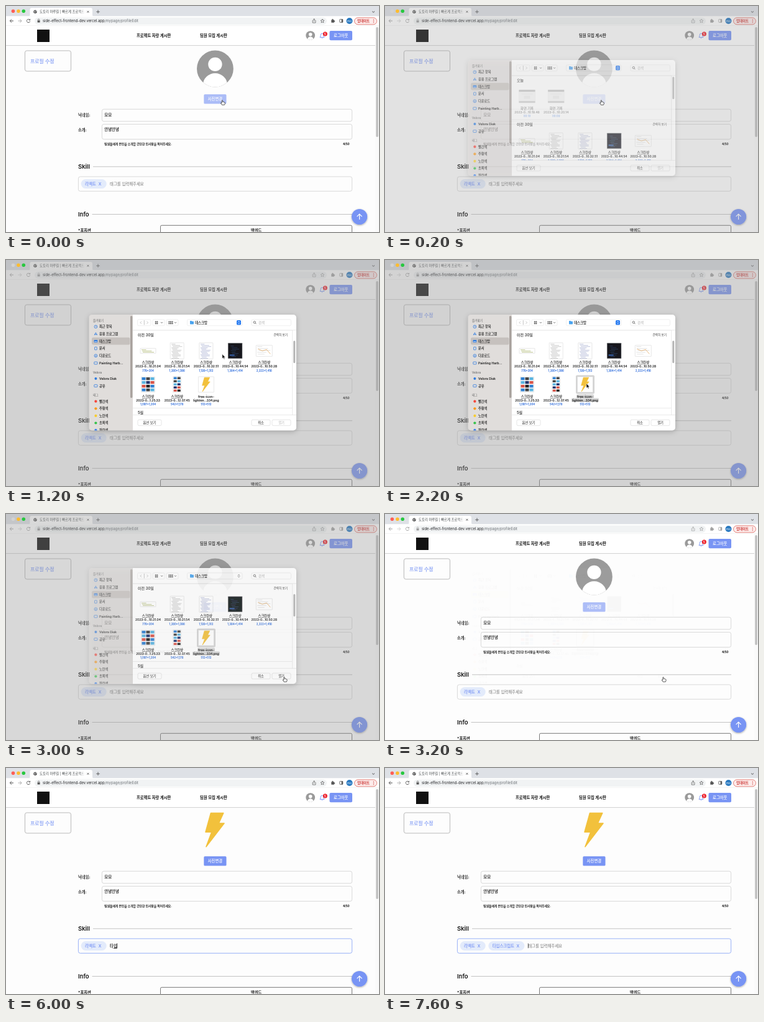
Animation of 600 by 364 pixels, one loop 8 s. Source, as an HTML page:

```html
<!DOCTYPE html>
<html lang="ko">
<head>
<meta charset="utf-8">
<title>Profile edit</title>
<style>
html, body { margin: 0; width: 100%; height: 100%; overflow: hidden; background: #fdfdfd; }
svg { display: block; width: 600px; height: 364px; }
text { font-family: Inter, "Noto Sans CJK KR", "Noto Sans CJK", sans-serif; white-space: pre; }
</style>
</head>
<body>
<svg id="stage" viewBox="0 0 600 364" xmlns="http://www.w3.org/2000/svg"></svg>
<script>
const BLUE = '#7894f4', INK = '#111';

// markup helpers; medium weight gets a hairline stroke, as Hangul may lack that weight
const text = (x, y, size, str, fill = INK, weight = 400, anchor = 'start', extra = '') =>
  `<text x="${x}" y="${y}" font-size="${size}" fill="${fill}" font-weight="${weight}" text-anchor="${anchor}"` +
  `${weight === 500 ? ` stroke="${fill}" stroke-width=".14"` : ''} ${extra}>${str}</text>`;
const rect = (x, y, w, h, fill, r = 0, extra = '') =>
  `<rect x="${x}" y="${y}" width="${w}" height="${h}" rx="${r}" fill="${fill}" ${extra}/>`;
const box = (x, y, w, h, stroke = '#d0d0d0', r = 3, extra = '') =>
  rect(x, y, w, h, '#fdfdfd', r, `stroke="${stroke}" stroke-width=".8" ${extra}`);
const dot = (x, y, r, fill, extra = '') => `<circle cx="${x}" cy="${y}" r="${r}" fill="${fill}" ${extra}/>`;
const line = (d, stroke, w = .8, extra = '') =>
  `<path d="${d}" fill="none" stroke="${stroke}" stroke-width="${w}" ${extra}/>`;
const group = (id, body, extra = '') => `<g id="${id}" ${extra}>${body}</g>`;

const bolt = '<path d="M329.5 72.5H349.8L342.3 89H351L322 126.8L330.8 103.3H321Z" fill="#f2c13c" stroke="#f2c13c" stroke-width="1.6" stroke-linejoin="round"/>';

function person(x, y, r, id) {
  return `<clipPath id="${id}"><circle cx="${x}" cy="${y}" r="${r}"/></clipPath>` +
    dot(x, y, r, '#9a9a9a') + dot(x, y - r * .24, r * .38, '#fff') +
    `<ellipse cx="${x}" cy="${y + r * .87}" rx="${r * .66}" ry="${r * .62}" fill="#fff" clip-path="url(#${id})"/>`;
}

function browser() {
  const icons =
    line('M12 24H6.5M9 21.3L6.3 24L9 26.7', '#555', 1) +
    line('M19.5 24H25M22.5 21.3L25.2 24L22.5 26.7', '#aaa', 1) +
    line('M38.3 22.4A2.7 2.7 0 1 0 38.7 24.6M38.7 20.8V22.8H36.5', '#555', .9) +
    rect(50.6, 23.3, 4, 3.2, '#555', .5) + line('M51.4 23.4V22.2A1.2 1.2 0 0 1 53.8 22.2V23.4', '#555', .7) +
    line('M494 23H493.2V27H498V23H497.2M495.6 25V20.8M494.2 22L495.6 20.6L497 22', '#555', .7) +
    line('M509 21L509.9 23L512 23.2L510.4 24.6L510.9 26.8L509 25.6L507.1 26.8L507.6 24.6L506 23.2L508.1 23Z', '#555', .7) +
    rect(523.3, 22.2, 4.6, 4.6, '#555', .6) + dot(525.4, 21.8, 1, '#555') + dot(528.2, 24.5, 1, '#555') +
    rect(536.8, 21.4, 5, 5, 'none', .6, 'stroke="#555" stroke-width=".8"') + rect(539.6, 21.4, 2.2, 5, '#555');
  return rect(0, 0, 600, 16.5, '#dee1e6') +
    '<path d="M36 16.5Q38.5 16.5 38.5 14V6Q38.5 3 41.5 3H136Q139 3 139 6V14Q139 16.5 141.5 16.5Z" fill="#fff"/>' +
    dot(47, 9.3, 2.7, '#555') + line('M45 8.2L47 9.2L46.3 11M48 7.2L49 9', '#fff', .7) +
    text(54, 11.3, 5.4, '도토리 마루길 | 빠르게 프로젝트를 ㅅ', '#3c4043', 400, 'start', 'clip-path="url(#tabClip)"') +
    rect(116, 4, 12, 11, 'url(#tabFade)') +
    line('M130.4 7.8L133.4 10.8M133.4 7.8L130.4 10.8', '#444', .8) + line('M148 6.5V12M145.2 9.3H150.8', '#444', .8) +
    line('M589 8.5L591 10.4L593 8.5', '#444', .9) +
    rect(0, 16.5, 600, 15.5, '#fff') + rect(46, 18.5, 470, 11.5, '#f1f3f4', 5.7) +
    group('icons', icons) +
    text(59, 26.4, 5.85, 'side-effect-frontend-dev.vercel.app<tspan fill="#6b7075">/mypage/profileEdit</tspan>', '#202124') +
    dot(552.5, 24, 5, '#2979c0') + text(552.5, 25.7, 4.6, 'mo', '#fff', 400, 'middle') +
    rect(560.5, 18.8, 36, 11, '#fdeceb', 5.5, 'stroke="#d95249" stroke-width=".7"') +
    text(565, 26.4, 5.4, '업데이트', '#c5221f', 500) +
    [21.8, 24.2, 26.6].map(y => dot(591.3, y, .6, '#c5221f')).join('') +
    line('M0 32H600', '#dcdcdc', .6);
}

const lights = dot(11.5, 8.3, 2.8, '#fe5f57', 'id="close"') + dot(20, 8.3, 2.8, '#febc2e') + dot(28.3, 8.3, 2.8, '#28c840');

const chip = (x, w, str, xPos) => rect(x, 279, w, 15, '#e3ebfb', 7.5) +
  text(x + 6.3, 288.9, 6.4, str, BLUE, 500) + text(xPos, 288.9, 6.6, 'X', BLUE, 500, 'middle');

function page() {
  return rect(0, 32, 600, 332, '#fdfdfd') + rect(0, 32, 600, 31.5, '#fff') + line('M0 63.6H594', '#c4c4c4', .8) +
    rect(50, 38, 20, 20, '#111') +
    text(210, 50, 6.3, '프로젝트 자랑 게시판', INK, 600) + text(312, 50, 6.3, '팀원 모집 게시판', INK, 600) +
    person(489.7, 47.6, 7.4, 'smallFace') +
    line('M505 50.4H512Q510.8 49.2 510.8 46.8A2.3 2.6 0 0 0 506.2 46.8Q506.2 49.2 505 50.4ZM507.6 51.4A1 1 0 0 0 509.4 51.4', BLUE, .9) +
    dot(513.4, 44.9, 3.5, '#ee1c25') + text(513.4, 46.8, 5, '5', '#fff', 600, 'middle') +
    rect(520.5, 40, 36.5, 15.3, BLUE, 2) + text(538.7, 50, 6.3, '로그아웃', '#fff', 500, 'middle') +
    box(30.5, 72, 74, 33, '#a9a9a9') + text(39, 91.6, 7.9, '프로필 수정', BLUE, 500) +
    group('face', person(336.4, 101, 29.4, 'bigFace')) + group('bolt', bolt) +
    rect(318.3, 142.3, 36.2, 15.2, BLUE, 1.6, 'id="change"') + text(336.4, 152.3, 6.3, '사진변경', '#fff', 500, 'middle') +
    text(116, 178.3, 6.3, '닉네임:', INK, 500) + box(154.4, 166.2, 402.2, 19.6) + text(158.3, 178.3, 6.4, '모모', INK, 500) +
    text(116, 202.3, 6.3, '소개:', INK, 500) + box(154.4, 190.4, 402.2, 24.2) + text(158.3, 200.8, 6.4, '안녕안녕', INK, 500) +
    text(158.3, 224.2, 4.75, '팀원들에게 본인을 소개할 간단한 인사말을 적어주세요.', INK, 500) +
    text(552.6, 224.2, 4.7, '4/50', INK, 500, 'end') +
    text(116, 262.4, 9.6, 'Skill', INK, 500) + line('M140 258.8H557', '#b4b4b4') +
    box(116.4, 274.9, 440.2, 23.4, '#d0d0d0', 3, 'id="field"') + chip(120.7, 41, '리액트', 151) +
    group('newChip', chip(166.4, 58, '타입스크립트', 213.8)) +
    text(167, 288.9, 6.4, '태그를 입력해주세요', '#757575', 400, 'start', 'id="hint"') +
    text(167, 288.9, 6.4, '', INK, 500, 'start', 'id="typed"') +
    rect(0, 290.3, 5.6, .7, INK, 0, 'id="under"') + rect(0, 282.4, .7, 7.8, INK, 0, 'id="caret"') +
    text(116, 339.3, 9.6, 'Info', INK, 500) + line('M138.5 335.5H557', '#b4b4b4') +
    text(116, 363.6, 6.3, '*포지션', INK, 600) + box(248.5, 353.3, 308, 20, '#555', 2) +
    text(402.5, 363.6, 6.3, '백엔드', INK, 500, 'middle') +
    dot(568.6, 339.5, 12.6, BLUE, 'filter="url(#soft)"') + line('M568.6 344V335.4M564.6 339.2L568.6 335.2L572.6 339.2', '#fff', 1.2) +
    rect(594, 32, 6, 332, '#fafafa') + rect(595.2, 34, 3.6, 177, '#c1c1c1', 1.8);
}

// sidebar of the file sheet
function sidebar() {
  const head = (y, s) => text(140, y, 4.6, s, '#858585', 500);
  const item = (y, s, icon) => icon(144.4, y) + text(150, y + 2, 5.2, s, '#2b2b2b', 500);
  const C = '#2f7be0', thin = `stroke="${C}" stroke-width=".8"`;
  const ring = (x, y) => dot(x, y, 2.4, 'none', thin) + line(`M${x} ${y - 1.4}V${y}H${x + 1.2}`, C, .6);
  const app = (x, y) => line(`M${x - 2} ${y + 2}L${x} ${y - 2.3}L${x + 2} ${y + 2}M${x - 2.4} ${y + .8}H${x + 2.4}`, C);
  const desk = (x, y) => rect(x - 2.8, y - 2, 5.6, 4, C, .8) + rect(x - 2, y + .5, 4, .7, '#fff');
  const doc = (x, y) => rect(x - 1.8, y - 2.3, 3.6, 4.6, 'none', .5, thin);
  const down = (x, y) => dot(x, y, 2.4, 'none', thin) + line(`M${x} ${y - 1.3}V${y + 1.2}M${x - 1} ${y + .3}L${x} ${y + 1.3}L${x + 1} ${y + .3}`, C, .6);
  const folder = (x, y) => rect(x - 2.6, y - 1.8, 5.2, 3.8, 'none', .6, thin);
  const plain = (x, y) => dot(x, y, 2, C);
  const tag = c => (x, y) => dot(x, y, 2.1, c);
  const rows = rect(138, 123.4, 61.5, 11.6, '#c6c1be', 2.5) +
    head(98, '즐겨찾기') + item(106, '최근 항목', ring) + item(117.7, '응용 프로그램', app) + item(129.4, '데스크탑', desk) +
    item(141, '문서', doc) + item(152.8, '다운로드', down) + item(164.5, 'Painting Harb...', folder) +
    head(181.5, 'Velora') + item(189.6, 'Velora Disk', plain) + item(201.2, '공유', folder) +
    head(217.7, '태그') +
    [['빨간색', '#f5443b'], ['주황색', '#f79a1d'], ['노란색', '#f7cc2f'], ['초록색', '#35c24c'], ['파란색', '#2f7bf0']]
      .map(([s, c], i) => item(226.3 + 11.6 * i, s, tag(c))).join('');
  return rect(133.5, 87, 70.5, 187, '#e0dddb') + `<g transform="translate(0 .4)">${rows}</g>` +
    rect(200, 89, 3.4, 132, '#a9a29e', 1.6);
}

// thumbnails, drawn around 0,0
const sheetOf = (w, h, fill = '#fff') => rect(-w / 2, -h / 2, w, h, fill, .5, 'stroke="#cfcfcf" stroke-width=".5"');
function lines(w, h, color, step = 1.9) {
  let s = '';
  for (let y = -h / 2 + 2, i = 0; y < h / 2 - 1; y += step, i++)
    s += rect(-w / 2 + 2 + (i % 3), y, (w - 6) * (.4 + .55 * Math.abs(Math.sin(i * 2.3))), .7, color);
  return s;
}
function tiles(cols, rows, w, h) {
  const colors = ['#2d7fd0', '#222', '#d8544a', '#20346e', '#5ab4e0', '#444'];
  let s = '';
  for (let i = 0; i < cols * rows; i++)
    s += rect(-w / 2 + 1 + (i % cols) * (w - 1) / cols, -h / 2 + 1 + Math.floor(i / cols) * (h - 1) / rows,
      (w - 1) / cols - 1, (h - 1) / rows - 1.4, colors[(i * 5 + Math.floor(i / cols)) % 6], .4);
  return s;
}
const thumbs = {
  clip: sheetOf(26, 21, '#ededed') + rect(-13, -10.5, 26, 3.2, '#777') + rect(-9, -4, 18, .8, '#bbb') + rect(-5, -1, 10, 5, '#d2d2d2') + rect(-13, 7.5, 26, 3, '#999'),
  strip: sheetOf(25, 8) + lines(25, 8, '#a9b46a'),
  doc: sheetOf(22, 26) + lines(22, 26, '#b9b9b9'),
  note: sheetOf(22, 26) + lines(22, 26, '#a9b0d2'),
  code: sheetOf(23, 25, '#14161c') + lines(18, 20, '#2f4468', 2.4) + rect(-9, 6, 8, 2, '#3560a8'),
  graph: sheetOf(26, 18) + lines(26, 18, '#d8d8d8', 3) + line('M-10 -3L-3 0L4 -2L10 5', '#e0a050', .7),
  grid: sheetOf(22, 25) + tiles(3, 4, 22, 25),
  tall: sheetOf(13, 26) + tiles(2, 5, 13, 26),
  bolt: sheetOf(25, 25) + `<g transform="scale(.42) translate(-336 -99.5)">${bolt}</g>`
};

function cell(i, y, thumb, a, b, size, extra = '') {
  const x = 228.5 + 46.7 * i;
  return `<g ${extra}><g transform="translate(${x} ${y})">${thumbs[thumb]}</g>` +
    text(x, y + 21, 5.3, a, '#222', 500, 'middle') + text(x, y + 27, 4.9, b, '#222', 500, 'middle') +
    text(x, y + 33.2, 4.3, size, '#3672dd', 500, 'middle') + '</g>';
}
const heading = (id, s, more = '') =>
  group(id, rect(204, 0, 256.5, 14.5, '#fff') + line('M204 0H460.5', '#dedede', .6) + text(212, 9.8, 6, s, '#444', 500) +
    (more && text(453, 9.4, 4.6, more, '#333', 400, 'end')));

function files() {
  const shot = (i, y, thumb, name, size) => cell(i, y, thumb, '스크린샷', '2023-0...' + name, size);
  const body = cell(0, 145.5, 'clip', '화면 기록', '2023-0...10.19.46', '00:10', 'opacity=".45"') +
    cell(1, 145.5, 'clip', '화면 기록', '2023-0...10.20.14', '00:09', 'opacity=".45"') +
    shot(0, 217.3, 'strip', '10.31.04', '778×204') + shot(1, 217.3, 'doc', '10.31.54', '1,280×1,396') +
    shot(2, 217.3, 'note', '10.32.51', '1,126×1,312') + shot(3, 217.3, 'code', '10.44.54', '1,384×1,414') +
    shot(4, 217.3, 'graph', '10.50.28', '2,222×1,416') +
    shot(0, 271.5, 'grid', '1.25.33', '1,097×1,204') + shot(1, 271.5, 'tall', '12.07.45', '542×1,176') +
    group('picked', rect(307, 256.5, 30, 30, '#d4d4d4', 2) + rect(308, 287.6, 28, 6, '#d4d4d4', 1.5) + rect(300, 293.4, 44, 6.4, '#d4d4d4', 1.5)) +
    cell(2, 271.5, 'bolt', 'free-icon-', 'lightnin...334.png', '512×512');
  return '<g clip-path="url(#listClip)">' + group('list', body) + heading('today', '오늘') +
    heading('month', '이전 30일', '간략히 보기') + heading('may', '5월') + '</g>';
}

function panel() {
  const button = (x, w, s, id) => rect(x, 256.3, w, 9.4, '#fff', 2, 'stroke="#d5d5d5" stroke-width=".6"') +
    text(x + w / 2, 263, 5.3, s, '#222', 400, 'middle', `id="${id}"`);
  const frame = (x, w) => rect(x, 94.8, w, 10, '#fff', 2, 'stroke="#e4e4e4" stroke-width=".6"');
  const cells = (x, n) => Array.from({ length: n }, (_, i) =>
    rect(x + (i % (n / 2)) * 2.6, 97.6 + (i >= n / 2 ? 2.7 : 0), 1.9, 1.9, '#555', .3)).join('');
  return rect(204, 87, 263, 187, '#fff') +
    frame(211.5, 21.5) + line('M218 97.8L216 99.8L218 101.8M226.5 97.8L228.5 99.8L226.5 101.8M222.3 96V103.6', '#aaa', .7) +
    frame(236, 19) + cells(239.8, 4) + line('M249 99L250.6 100.6L252.2 99', '#444', .7) +
    frame(258, 19) + cells(261.5, 6) + line('M271 99L272.6 100.6L274.2 99', '#444', .7) +
    frame(291.5, 88.5) + rect(296, 97.7, 6, 4.7, '#4aa3ee', .7) + rect(296, 96.9, 2.8, 2, '#4aa3ee', .5) + text(304, 101.9, 5.4, '데스크탑', '#222', 500) +
    rect(371, 96.1, 7, 7.4, '#2478f0', 1.6, 'id="pop"') + line('M373 99.2L374.5 97.7L376 99.2M373 100.4L374.5 101.9L376 100.4', '#fff', .8, 'id="arrows"') +
    frame(395, 63.5) + dot(399.8, 99.3, 1.7, 'none', 'stroke="#444" stroke-width=".7"') + line('M401 100.6L402.5 102.1', '#444') + text(406, 101.9, 5.4, '검색', '#aaa') +
    files() + line('M204 112H467M204 248.6H467M460.7 112V248.6', '#dcdcdc', .6) +
    rect(462.3, 114, 3, 36, '#b5b5b5', 1.5, 'id="thumb"') +
    button(212, 38, '옵션 보기', 'options') + button(395, 30, '취소', 'cancel') + button(428, 30, '열기', 'open');
}

const cursors =
  group('hand', '<path transform="scale(.85)" d="M-.9 .8Q0 -.6 .9 .8V3.4Q2 2.8 2.6 3.7Q3.7 3.2 4 4.2Q5.2 4 5.2 5.2V6.8L4.3 9H-.6Q-1.7 7.4-2.8 5.6Q-2.6 4.4-.9 5.6Z" fill="#fff" stroke="#111" stroke-width=".8" stroke-linejoin="round"/>') +
  group('arrow', '<path d="M0 0V7.2L1.7 5.7L2.8 8.2L4 7.7L2.9 5.3H5.1Z" fill="#111" stroke="#fff" stroke-width=".5"/>') +
  group('beam', line('M-1.4 -3.8Q0 -3.8 0 -2.8Q0 -3.8 1.4 -3.8M0 -2.8V2.8M-1.4 3.8Q0 3.8 0 2.8Q0 3.8 1.4 3.8', '#111', .7));

const stage = document.getElementById('stage');
stage.innerHTML = `<defs>
  <clipPath id="tabClip"><rect x="54" y="3" width="74" height="13"/></clipPath>
  <clipPath id="listClip"><rect x="204" y="112" width="256.7" height="136.6"/></clipPath>
  <clipPath id="sheetClip"><rect x="133.5" y="87" width="333.5" height="186.5" rx="5"/></clipPath>
  <linearGradient id="tabFade"><stop stop-color="#fff" stop-opacity="0"/><stop offset="1" stop-color="#fff"/></linearGradient>
  <filter id="soft" x="-50%" y="-50%" width="200%" height="200%"><feDropShadow dx="0" dy="1" stdDeviation="1.5" flood-opacity=".35"/></filter>
  <filter id="lift" x="-20%" y="-20%" width="140%" height="150%"><feDropShadow dx="0" dy="2" stdDeviation="4" flood-opacity=".22"/></filter>
</defs>` + browser() + page() + rect(0, 0, 600, 364, '#969696', 0, 'id="dim"') + lights +
  group('sheet', `<g filter="url(#lift)"><g clip-path="url(#sheetClip)">${group('side', sidebar())}${group('main', panel())}</g></g>`) +
  group('cursor', cursors);

const el = {};
stage.querySelectorAll('[id]').forEach(n => el[n.id] = n);
const set = (id, name, v) => el[id].setAttribute(name, v);
const show = (id, on) => set(id, 'visibility', on ? 'inherit' : 'hidden');
const move = (id, x, y) => set(id, 'transform', `translate(${x} ${y})`);

// value between [time, value] points, optionally eased
function track(t, points, ease = u => u) {
  if (t <= points[0][0]) return points[0][1];
  for (let i = 1; i < points.length; i++) {
    const [t0, a] = points[i - 1], [t1, b] = points[i];
    if (t < t1) return a + (b - a) * ease((t - t0) / (t1 - t0));
  }
  return points[points.length - 1][1];
}
const smooth = u => u * u * (3 - 2 * u);

// each syllable as the input method composes it
const typing = [[5400, 'ㅌ'], [5500, '타'], [5600, '탕'], [5800, '타이'], [6000, '타입'], [6300, '타입ㅅ'], [6400, '타입스'],
  [6600, '타입슼'], [6800, '타입스크'], [6900, '타입스클'], [7000, '타입스크리'], [7100, '타입스크립'],
  [7300, '타입스크립ㅌ'], [7400, '타입스크립트'], [7600, '']];

function render(t) {
  const inside = t >= 100 && t < 3400;
  const open = t >= 100 && t < 3260;
  set('icons', 'opacity', inside ? .55 : 1);
  set('close', 'fill', t >= 200 && t < 3150 ? '#d2d2d2' : '#fe5f57');
  set('dim', 'opacity', track(t, [[60, 0], [280, .42], [2900, .42], [3000, .36], [3180, 0]]));
  show('sheet', open);
  move('sheet', 0, track(t, [[400, 0], [600, 1], [2700, 1], [2900, 0]]));
  set('main', 'opacity', track(t, [[60, 0], [290, 1], [2900, 1], [3000, .85], [3200, .02], [3260, 0]]));
  set('side', 'opacity', track(t, [[60, 0], [290, 1], [2900, 1], [3000, .55], [3200, .01], [3260, 0]]));

  const scroll = track(t, [[400, 0], [1100, 72]], smooth);
  const month = Math.max(112, 183 - scroll);
  move('list', 0, -scroll);
  move('month', 0, month);
  move('today', 0, Math.min(112, month - 14.5));
  move('may', 0, 309.5 - scroll);
  move('thumb', 0, scroll * .208);
  show('picked', t >= 2000);
  set('open', 'fill', t >= 2000 ? '#222' : '#b5b5b5');
  set('pop', 'fill', t >= 2900 ? '#fff' : '#2478f0');
  set('arrows', 'stroke', t >= 2900 ? '#444' : '#fff');

  show('face', t < 3400);
  show('bolt', t >= 3400);
  set('change', 'fill', t < 3900 ? '#abbcf7' : BLUE);

  const focus = t >= 4800, done = t >= 7600;
  let typed = '';
  for (const [at, s] of typing) if (t >= at) typed = s;
  const start = done ? 230.2 : 167;
  set('field', 'stroke', focus ? '#7f9df5' : '#d0d0d0');
  show('newChip', done);
  show('hint', !typed);
  set('hint', 'x', start);
  el.typed.textContent = typed;
  const width = typed ? el.typed.getComputedTextLength() : 0;
  show('under', typed);
  set('under', 'x', 167 + width - width / (typed.length || 1));
  show('caret', focus);
  set('caret', 'x', start + width - .3);

  const x = track(t, [[0, 347.8], [1300, 347.8], [1900, 324], [2200, 324], [2700, 447.6], [3900, 447.6], [4500, 212]], smooth);
  const y = track(t, [[0, 151.6], [1300, 151.6], [1900, 199], [2200, 199], [2700, 262.6], [3900, 262.6], [4500, 286.5]], smooth);
  const kind = t < 400 || (t >= 2900 && t < 3900) ? 'hand' : t >= 4400 ? 'beam' : 'arrow';
  ['hand', 'arrow', 'beam'].forEach(k => show(k, k === kind));
  show('cursor', t < 5400);
  move('cursor', x, y);
}

const begin = performance.now();
function tick() {
  render((performance.now() - begin) % 8000);
  requestAnimationFrame(tick);
}
tick();
</script>
</body>
</html>
```
